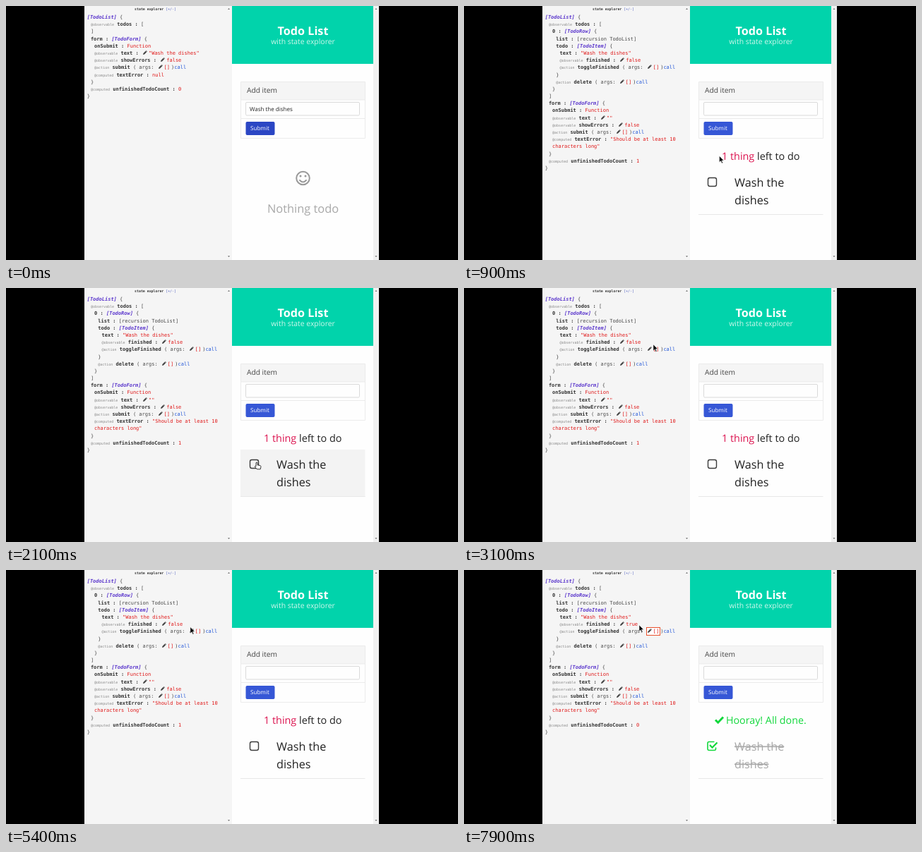
Recreate the animation shown at these times as an HTML page. Size 640 by 360 pixels, loop 8000 ms.

```html
<!DOCTYPE html>
<html lang="en">
<head>
<meta charset="utf-8">
<title>Todo List with state explorer</title>
<style>
  html, body { margin: 0; width: 100%; height: 100%; overflow: hidden; background: #000; }
  #tree {
    position: absolute; left: 111px; top: 0; width: 209px; height: 349px; padding-top: 11px;
    background: #f5f5f5; color: #4a4a4a; white-space: pre;
    font: 7px/10.19px "DejaVu Sans Mono", monospace; text-rendering: geometricPrecision;
  }
  #tree div { height: 10.19px; }
  #tree span, #tree b, #tree i { line-height: 0; }
  #tree b { color: #333; }
  #tree i { color: #5a36cc; font-weight: bold; }
  .tag { font-size: 5px; color: #888; }
  .value { color: #e01818; }
  .call { color: #2458d8; }
  .edit { padding: 2px; color: #e01818; }
  .edit svg { width: 6px; height: 6px; margin-right: 2px; }
  .active { outline: 1px solid #e8502c; outline-offset: -1px; background: #fff; }
  .selected { background: #ec7038; color: #fff0e0; padding: 1px 0; }
  #stage { position: absolute; left: 0; top: 0; }
  #stage text { font-family: "Open Sans", sans-serif; text-rendering: geometricPrecision; }
</style>
</head>
<body>
<div id="tree"></div>
<svg id="stage" width="640" height="360" viewBox="0 0 640 360">
  <text x="211.5" y="6" text-anchor="middle" font-size="4.9" font-weight="bold" fill="#333" style="font-family:'DejaVu Sans Mono',monospace">state explorer <tspan fill="#5060c0" font-weight="normal">[+/-]</tspan></text>
  <path d="M320 0h200v360h-200z" fill="#fefefe"/>
  <path d="M520 0h8v360h-8z" fill="#f1f1f1"/>
  <path d="M314 5l1.5-2 1.5 2zM314 354l1.5 2 1.5-2zM522.5 5l1.5-2 1.5 2zM522.5 354l1.5 2 1.5-2z" fill="#777"/>
  <path d="M320 0h200v82h-200z" fill="#01d3ab"/>
  <g text-anchor="middle">
    <text x="420.5" y="41" font-size="16.2" font-weight="bold" fill="#fff">Todo List</text>
    <text x="420.5" y="54" font-size="10.4" fill="#d0f7ec">with state explorer</text>
  </g>

  <path d="M333 108h175v25h-175z" fill="#f5f5f5"/>
  <path d="M332.5 107.5h176v80h-176zM332.5 133h176M332.5 159.5h176" fill="none" stroke="#ebebeb"/>
  <rect x="339.5" y="136.5" width="161" height="18.5" rx="1.5" fill="#fefefe" stroke="#dadada"/>
  <text x="341" y="123" font-size="10.2" fill="#444">Add item</text>
  <rect id="button" x="339.5" y="164" width="41" height="19" rx="2"/>
  <text x="346" y="176.2" font-size="8.1" fill="#fff">Submit</text>

  <g id="empty">
    <text x="345" y="148.5" font-size="8" fill="#222">Wash the dishes</text>
    <g fill="none" stroke="#999" stroke-width="2" stroke-linecap="round">
      <circle cx="420.5" cy="244" r="9.3"/>
      <path d="M416 247q4.5 5 9 0"/>
    </g>
    <path d="M415.5 241a1.5 1.5 0 0 1 3 0 1.5 1.5 0 0 1-3 0M422.5 241a1.5 1.5 0 0 1 3 0 1.5 1.5 0 0 1-3 0" fill="#999"/>
    <text x="420.5" y="292.5" text-anchor="middle" font-size="16.4" fill="#a8a8a8">Nothing todo</text>
  </g>

  <g id="list">
    <path id="hover" d="M332 229h176.5v67h-176.5z" fill="#f3f3f3"/>
    <path d="M332 295.5h176.5" stroke="#e8e8e8"/>
    <g id="item" font-size="16.2">
      <text x="383" y="256">Wash the</text>
      <text x="383" y="281">dishes</text>
    </g>
  </g>
  <g id="open">
    <text x="365" y="217.5" font-size="14.4" fill="#222"><tspan fill="#dc1450">1 thing</tspan> left to do</text>
    <rect x="345.5" y="243.5" width="12" height="12" rx="2.5" fill="none" stroke="#3c3c3c" stroke-width="1.4"/>
  </g>
  <g id="done">
    <text x="371" y="217.5" font-size="14.25" fill="#12d83c">Hooray! All done.</text>
    <g fill="none" stroke="#12d83c">
      <path d="M356 212.5l3.7 3.7 7.3-7.7" stroke-width="3"/>
      <path d="M356.5 251.5v2q0 2-2 2h-7.5q-2 0-2-2v-8q0-2 2-2h7.5" stroke-width="1.6"/>
      <path d="M348 248l3.5 3.7 7-7.2" stroke-width="2.3"/>
    </g>
  </g>

  <g id="cursor">
    <path id="arrow" d="M0 0v9l2.1-1.9 1.5 3.3 1.4-.6-1.5-3.2h2.8z" fill="#000" stroke="#fff" stroke-width=".5"/>
    <path id="hand" d="M-1 .6q1-1.3 2 0v3.2l4 .9q1 .4 1 1.5l-.8 3.6h-4.8l-3.2-3.6q.3-1.3 1.8-.4z" fill="#fff" stroke="#222" stroke-width=".9"/>
    <path id="beam" d="M-1.5-3.5h3M0-3.5v7M-1.5 3.5h3" fill="none" stroke="#333" stroke-width=".8"/>
  </g>
</svg>
<script>
const LOOP = 8000, STEP = 100;
const $ = id => document.getElementById(id);
const show = (id, on) => { $(id).style.display = on ? '' : 'none'; };

// Cursor path: time, x, y
const path = [
  [500, 368, 178], [1300, 355, 247], [2500, 355, 247], [3100, 268, 80], [3500, 244, 76],
  [4100, 286, 86], [4900, 286, 86], [5800, 243, 77], [7600, 243, 77], [7900, 248, 78]
];

function cursorAt(t) {
  const next = path.findIndex(point => point[0] > t);
  if (next < 1) return path[next ? path.length - 1 : 0].slice(1);
  const [t0, x0, y0] = path[next - 1], [t1, x1, y1] = path[next];
  const u = (t - t0) / (t1 - t0), ease = u * u * (3 - 2 * u);
  return [x0 + (x1 - x0) * ease, y0 + (y1 - y0) * ease];
}

const pencil = '<svg viewBox="0 0 6 6"><path d="M0 6l.5-2 3.2-3.2 1.5 1.5-3.2 3.2zM4.1.5l.5-.5 1.4 1.4-.5.5z" fill="#444"/></svg>';
const span = (cls, text) => `<span class="${cls}">${text}</span>`;
const type = name => `<i>[${name}]</i> `;
const edit = (text, active) => span('edit' + (active ? ' active' : ''), pencil + text);
const field = (name, value, tag) => (tag ? span('tag', '@' + tag) + ' ' : '') + `<b>${name} :</b> ${value}`;
const action = (name, active) => `${span('tag', '@action')} <b>${name}</b> ( args: ${edit('[]', active)})${span('call', 'call')}`;
const red = text => span('value', text);

function tree({ empty, done, finished, editing, argsActive }) {
  const row = [
    [2, field('0', type('TodoRow') + '{')],
    [3, field('list', '[recursion TodoList]')],
    [3, field('todo', type('TodoItem') + '{')],
    [4, field('text', red('"Wash the dishes"'))],
    [4, field('finished', edit(finished, editing), 'observable')],
    [4, action('toggleFinished', argsActive)],
    [3, '}'],
    [3, action('delete')],
    [2, '}']
  ];
  const error = empty
    ? [[2, field('textError', red('null'), 'computed')]]
    : [[2, field('textError', red('"Should be at least 10'), 'computed')], [2, red('characters long"')]];
  return [
    [0, type('TodoList') + '{'],
    [1, field('todos', '[', 'observable')],
    ...(empty ? [] : row),
    [1, ']'],
    [1, field('form', type('TodoForm') + '{')],
    [2, field('onSubmit', red('Function'))],
    [2, field('text', edit(empty ? '"Wash the dishes"' : '""'), 'observable')],
    [2, field('showErrors', edit('false'), 'observable')],
    [2, action('submit')],
    ...error,
    [1, '}'],
    [1, field('unfinishedTodoCount', red(empty || done ? 0 : 1), 'computed')],
    [0, '}']
  ].map(([level, html]) => `<div style="padding-left:${3.7 + level * 5.2}px">${html}</div>`).join('');
}

function typed(t) {
  if (t < 6300) return 'false';
  if (t < 6500) return span('selected', 'false');
  return 'true'.slice(0, t < 6700 ? 1 : t < 6800 ? 2 : t < 6900 ? 3 : 4);
}

let lastTree = '';
function draw() {
  const t = Math.floor(performance.now() % LOOP / STEP) * STEP;
  const empty = t < 100;
  const done = t >= 1400 && t < 1800 || t >= 4300 && t < 4800 || t >= 7100;
  const editing = t >= 5900 && t < 7100;
  const html = tree({
    empty, done, editing,
    finished: editing ? typed(t) : String(done),
    argsActive: t >= 7700
  });
  if (html !== lastTree) $('tree').innerHTML = lastTree = html;

  const [x, y] = cursorAt(t);
  const within = (left, top, right, bottom) => x >= left && x <= right && y >= top && y <= bottom;
  const onButton = within(339, 164, 380, 183);
  const hand = onButton || within(344, 242, 359, 257) || within(282, 83, 299, 92);
  show('cursor', t >= 500 && (t < 6500 || t >= 7700));
  show('beam', editing);
  show('hand', hand && !editing);
  show('arrow', !hand && !editing);
  $('cursor').setAttribute('transform', `translate(${x} ${y})`);

  $('button').setAttribute('fill', empty ? '#2b46c4' : onButton ? '#3048d2' : '#3657d6');
  show('empty', empty);
  show('list', !empty);
  show('open', !empty && !done);
  show('done', done);
  show('hover', within(332, 229, 508, 296));
  $('item').setAttribute('fill', done ? '#a8a8a8' : '#222');
  $('item').setAttribute('text-decoration', done ? 'line-through' : 'none');
  requestAnimationFrame(draw);
}
draw();
</script>
</body>
</html>
```
